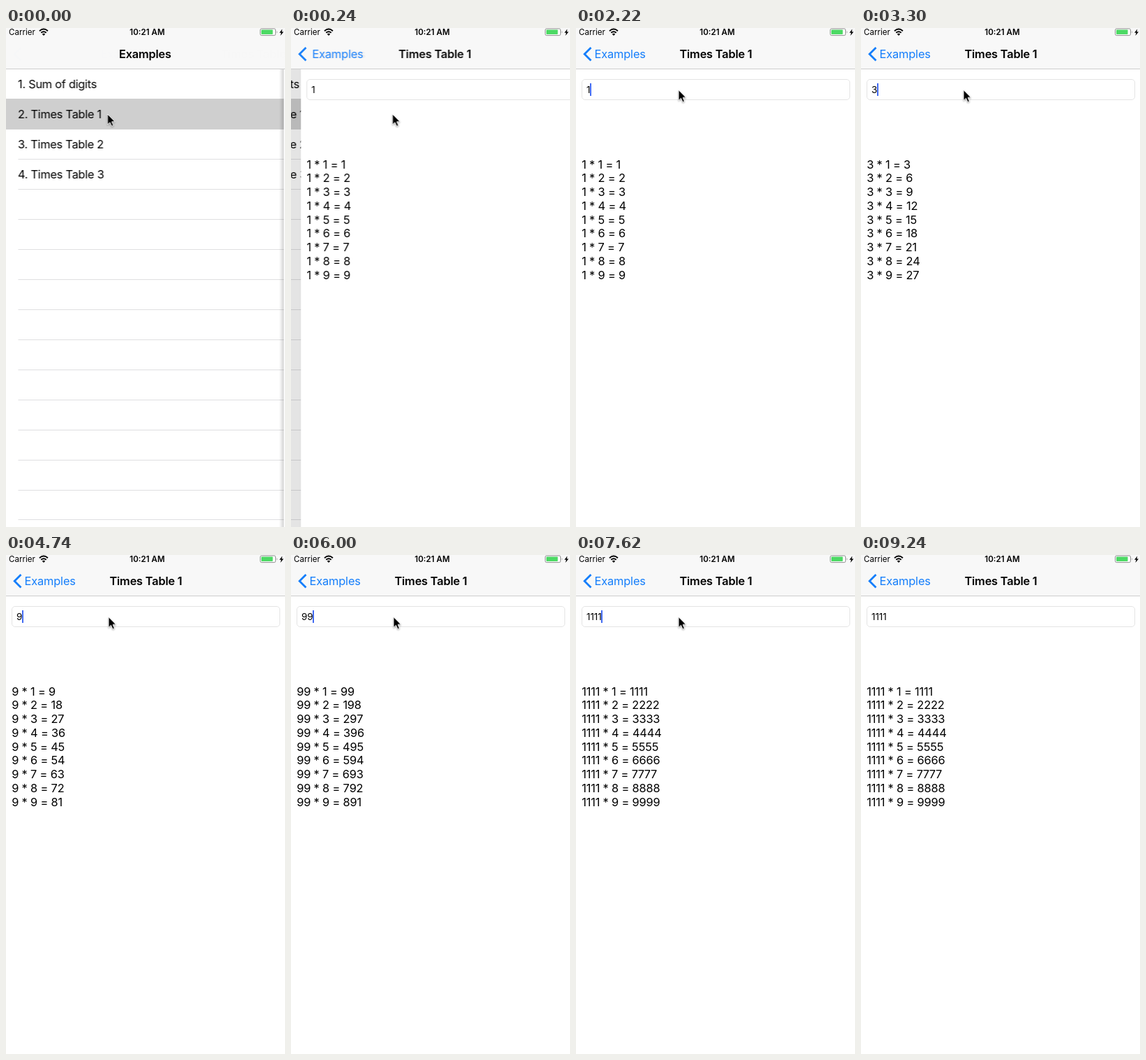
Recreate the animation shown at these times as an HTML page. Size 400 by 713 pixels, loop 9.3 s.

```html
<!DOCTYPE html>
<html lang="en">
<head>
<meta charset="utf-8">
<title>Times Table</title>
<style>
  html, body { margin: 0; width: 100%; height: 100%; overflow: hidden; background: #fff; }
  body {
    --spring: linear(0, .09 4%, .36 11.1%, .717 22.2%, .891 33.3%, .964 44.4%, .987 55.6%, .996 66.7%, 1);
    font: 16.4px Inter, "Noto Sans", sans-serif;
    color: #000;
  }
  #stage { position: relative; width: 400px; height: 713px; overflow: hidden; }
  #stage * { position: absolute; white-space: pre; }

  /* Shared push transition */
  .push { animation: push 9300ms var(--spring) infinite; }
  @keyframes push {
    from { transform: translateX(var(--x0, 0px)); opacity: var(--o0, 1); }
    5.806%, to { transform: translateX(var(--x1, 0px)); opacity: var(--o1, 1); }
  }

  #list { --x1: -123px; inset: 0; }
  #list p { left: 17.5px; margin: 0; line-height: 43px; letter-spacing: -.28px; }
  #list i { left: 18px; width: 382px; height: 1px; background: #dfdfe1; }
  #picked { left: 0; top: 101px; width: 400px; height: 44px; background: #cfcfcf; }
  #dim { --o0: 0; inset: 0; width: 523px; background: rgba(0, 0, 0, .11); }

  #page { --x0: 400px; inset: 0; background: #fff; }
  #shade {
    --x0: 0px; --o1: 0; left: -7px; top: 0; width: 7px; height: 713px;
    background: linear-gradient(90deg, transparent, rgba(0, 0, 0, .18));
  }
  #field {
    left: 8px; top: 73px; width: 385px; height: 30px; box-sizing: border-box;
    border: 1px solid #e4e4e4; border-radius: 5px;
    font-size: 13.5px; line-height: 28px; font-kerning: none;
  }
  #entry { left: 5.9px; top: 0; height: 28px; }
  #stage #value { position: static; }
  #caret { left: calc(100% - .7px); top: 5px; width: 2px; height: 18px; background: #426bf2; }
  #table { left: 8.2px; top: 185.6px; line-height: 19.77px; letter-spacing: -.18px; font-kerning: none; }

  #bar {
    left: 0; top: 0; width: 400px; height: 58px;
    background: #f8f8f8; border-bottom: 1px solid #cdcdcd;
  }
  .title {
    left: 0; top: 25px; width: 400px; text-align: center;
    line-height: 24px; font-weight: 600; letter-spacing: -.22px;
  }
  #old { --x1: -135px; --o1: 0; }
  #new { --x0: 160px; --o0: 0; left: .5px; }
  #back { --x0: 110px; --o0: 0; left: 26.5px; top: 25px; line-height: 24px; letter-spacing: -.16px; color: #157efb; }
  #chevron { --o0: 0; left: 0; top: 20px; }
  .status { top: 0; font-size: 11.6px; line-height: 13px; }
  #clock { left: 0; width: 405px; text-align: center; font-weight: 600; }
  #icons { left: 0; top: 0; }

  #cursor { left: -2px; top: -3px; animation: roam 9300ms infinite; }
  @keyframes roam {
    from, 6.2% { transform: translate(145.5px, 124px); animation-timing-function: ease-in-out; }
    10%, 90.3% { transform: translate(147px, 89.5px); animation-timing-function: ease-in; }
    94.9%, to { transform: translate(297px, 732px); }
  }
</style>
</head>
<body>
<div id="stage">
  <div id="list" class="push">
    <div id="picked"></div>
    <div id="dim" class="push"></div>
  </div>

  <div id="page" class="push">
    <div id="shade" class="push"></div>
    <div id="field"><span id="entry"><span id="value">1</span><b id="caret"></b></span></div>
    <div id="table"></div>
  </div>

  <div id="bar">
    <div id="old" class="title push">Examples</div>
    <div id="new" class="title push">Times Table 1</div>
    <svg id="chevron" class="push" width="26" height="36">
      <path d="M21.5 8 12.2 17.2 21.5 26.4" fill="none" stroke="#157efb" stroke-width="2.8"/>
    </svg>
    <span id="back" class="push">Examples</span>
    <span class="status" style="left:4px">Carrier</span>
    <span id="clock" class="status">10:21 AM</span>
    <svg id="icons" width="400" height="14">
      <g fill="none" stroke="#000" stroke-width="1.9">
        <path d="M48 4.2Q54 -1 60 4.2"/>
        <path d="M50.3 6.8Q54 3.6 57.7 6.8"/>
      </g>
      <path d="M51.8 8.7Q54 6.9 56.2 8.7L54 11Z"/>
      <rect x="364.5" y="1" width="22" height="9.6" rx="2" fill="#fff" stroke="#8e8e8e"/>
      <rect x="366" y="2.5" width="16.5" height="6.6" rx=".8" fill="#4cd964"/>
      <path d="M388 4.2q1.7 1.6 0 3.2z" fill="#8e8e8e"/>
      <path d="M396.2 1.5 392 6.8h2.5L393.4 11 398 5.4h-2.6z"/>
    </svg>
  </div>

  <svg id="cursor" width="18" height="24">
    <path d="M2 2V17.2L5.5 13.9 8 19.4 10.6 18.3 8.2 12.9H12.8Z" fill="#000" stroke="#fff" stroke-width="1"
      style="filter:drop-shadow(0 1px 1px rgba(0,0,0,.35))"/>
  </svg>
</div>
<script>
  const LOOP = 9300, FOCUS = 1740;
  const $ = id => document.getElementById(id);

  // [time, text in the field]
  const edits = [
    [0, "1"], [2640, ""], [2800, "3"], [4440, ""], [4620, "9"], [4840, "99"],
    [6360, "9"], [6540, ""], [6840, "1"], [7020, "11"], [7200, "111"], [7500, "1111"]
  ];

  const add = (tag, top, text = "") => {
    const el = document.createElement(tag);
    el.style.top = top + "px";
    el.textContent = text;
    $("list").insertBefore(el, $("dim"));
  };
  for (let k = 3; k <= 15; k++) add("i", Math.round(58.2 + 42.95 * k));
  ["Sum of digits", "Times Table 1", "Times Table 2", "Times Table 3"]
    .forEach((name, k) => add("p", 58.5 + 43 * k, `${k + 1}. ${name}`));

  const timesTable = n =>
    Array.from({ length: 9 }, (_, i) => `${n} * ${i + 1} = ${n * (i + 1)}`).join("\n");

  // Half a second solid, then fade out and back in
  function blink(age) {
    const p = age % 1000;
    if (p <= 500) return 1;
    return p < 750 ? Math.max(0, 1 - (p - 500) / 200) : Math.max(0, (p - 800) / 200);
  }

  function render(t) {
    const past = edits.filter(([at]) => at <= t);
    const [at, text] = past[past.length - 1];
    // An empty field keeps the previous table
    const factor = past.filter(e => e[1]).pop()[1];
    $("value").textContent = text;
    $("table").textContent = timesTable(factor);
    $("caret").style.opacity = t < FOCUS ? 0 : blink(t - Math.max(at, FOCUS));
  }

  let start;
  function tick(now) {
    start ??= now;
    render((now - start) % LOOP);
    requestAnimationFrame(tick);
  }
  render(0);
  requestAnimationFrame(tick);
</script>
</body>
</html>
```
